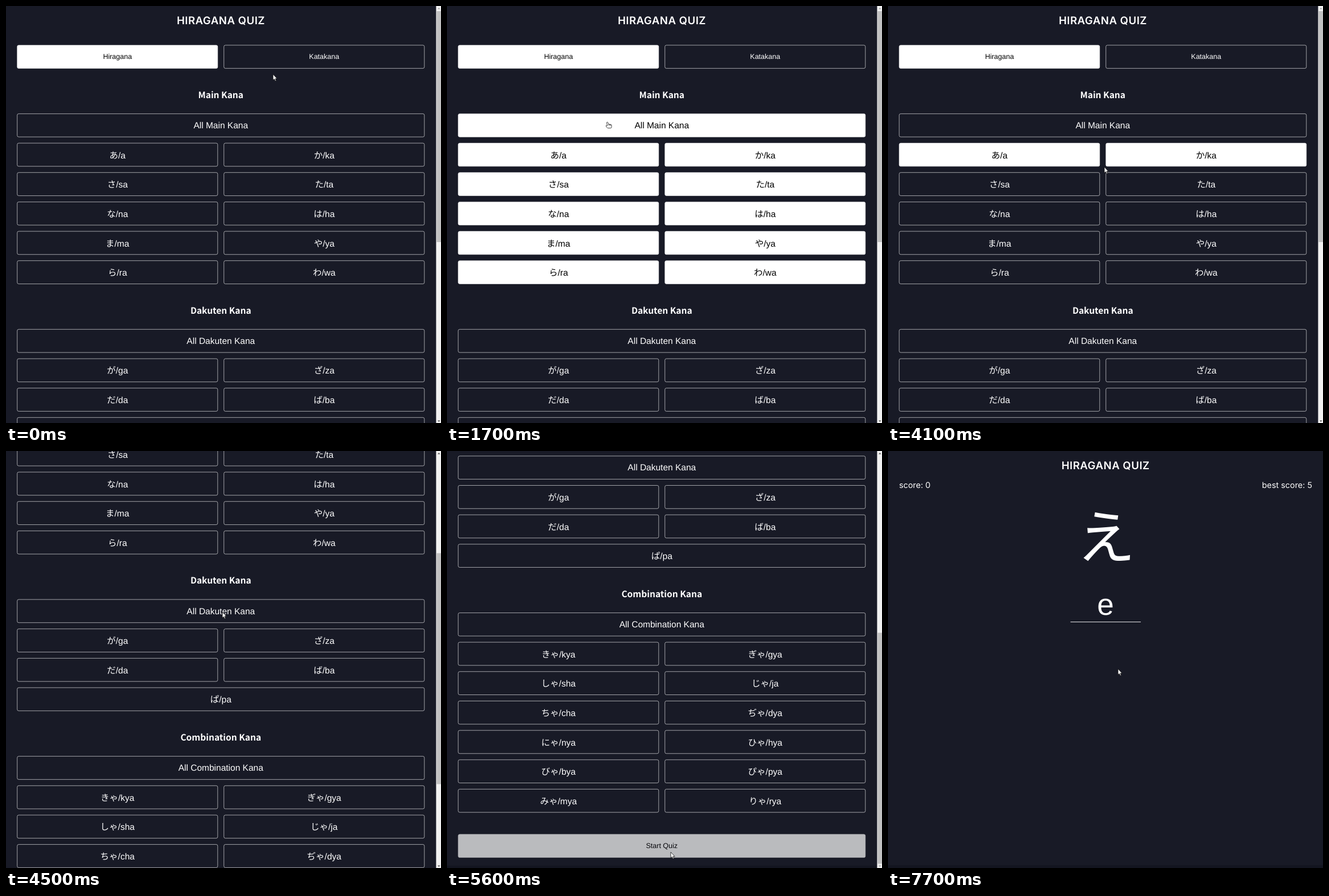
Recreate the animation shown at these times as an HTML page. Size 764 px wide and 733 px high, loop 8 s.

```html
<!DOCTYPE html>
<html lang="en">
<head>
<meta charset="utf-8">
<title>Kana quiz</title>
<style>
html, body { margin: 0; width: 100%; height: 100%; overflow: hidden; background: #181a26; }
svg { display: block; width: 764px; height: 733px; }
text {
  fill: #fff; text-anchor: middle; text-rendering: geometricPrecision;
  font-family: "Liberation Sans", "Noto Sans CJK JP", sans-serif;
}
.title { font: 600 18.6px Inter, sans-serif; letter-spacing: .5px; }
.score { font: 400 14.4px Inter, sans-serif; }
.head { font: 700 15.5px "Noto Sans CJK JP", sans-serif; }
.tab { font-size: 12.5px; }
.kana { font-size: 15.5px; }
.big { font: 500 103px "Noto Sans CJK JP", sans-serif; }
.answer { font-size: 53px; }
.btn rect { fill: none; stroke: #fff; stroke-width: .6px; }
.on rect { fill: #fff; }
.on text { fill: #000; }
</style>
</head>
<body>
<svg id="stage" viewBox="0 0 764 733"></svg>
<script>
const LOOP = 8000, STEP = 100;
const PAD = 19.4, GAP = 10.33, HIGH = 41.33, PITCH = HIGH + GAP;
const stage = document.getElementById('stage');

function add(parent, tag, attrs = {}, content) {
  const el = document.createElementNS('http://www.w3.org/2000/svg', tag);
  for (const key in attrs) el.setAttribute(key, attrs[key]);
  if (content) el.textContent = content;
  parent.appendChild(el);
  return el;
}

function label(parent, cls, x, y, content, anchor = 'middle') {
  return add(parent, 'text', { class: cls, x, y, style: 'text-anchor:' + anchor }, content);
}

const box = (parent, x, y, width, height, fill) => add(parent, 'rect', { x, y, width, height, fill });

// Builds one selection page; returns its group and the buttons by name.
function menu(width, title, sections) {
  const g = add(stage, 'g'), found = {};
  const full = width - 2 * PAD, half = (full - GAP) / 2;

  function button(y, text, cls, drop, col) {
    const b = found[text] = add(g, 'g', { class: 'btn' });
    const w = col === undefined ? full : half;
    const x = PAD + (col ? half + GAP : 0);
    add(b, 'rect', { x: x + .3, y: y + .3, width: w - .6, height: HIGH - .6, rx: 2.6 });
    label(b, cls, x + w / 2, y + drop, text);
    return b;
  }

  label(g, 'title', width / 2 + .2, 32, title);
  ['Hiragana', 'Katakana'].forEach((text, i) => button(68.6, text, 'tab', 24.5, i));
  let y = 189.1;
  for (const [name, words] of sections) {
    const list = words.split(' ');
    label(g, 'head', width / 2, y - 27.5, name + ' Kana');
    button(y, `All ${name} Kana`, 'kana', 25.9);
    list.forEach((word, i) => {
      const alone = i % 2 === 0 && i === list.length - 1;
      button(y + PITCH * (1 + (i >> 1)), word, 'kana', 26.8, alone ? undefined : i % 2);
    });
    y += PITCH * Math.ceil(list.length / 2) + HIGH + 79.3;
  }
  button(y - 41.2, 'Start Quiz', 'tab', 24.5).classList.add('on');
  box(g, 0, Math.max(728, y + 14), width, 6, '#131520');
  return { g, found };
}

const MAIN = 'あ/a か/ka さ/sa た/ta な/na は/ha ま/ma や/ya ら/ra わ/wa';
const hira = menu(754.5, 'HIRAGANA QUIZ', [
  ['Main', MAIN],
  ['Dakuten', 'が/ga ざ/za だ/da ば/ba ぱ/pa'],
  ['Combination', 'きゃ/kya ぎゃ/gya しゃ/sha じゃ/ja ちゃ/cha ぢゃ/dya ' +
    'にゃ/nya ひゃ/hya びゃ/bya ぴゃ/pya みゃ/mya りゃ/rya']
]);
const kata = menu(764, 'KATAKANA QUIZ', [
  ['Main', 'ア/a カ/ka サ/sa タ/ta ナ/na ハ/ha マ/ma ヤ/ya ラ/ra ワ/wa']
]);

// Scrollbar
const bar = add(stage, 'g');
box(bar, 755.4, 0, 8.6, 733, '#f1f1f1');
const thumb = box(bar, 756.4, 9, 7.6, 406, '#c1c1c1');
const up = add(bar, 'path', { d: 'M758 5.5L760.3 3L762.6 5.5Z' });
const down = add(bar, 'path', { d: 'M758 728.5L760.3 731L762.6 728.5Z' });

// Question page
const quiz = add(stage, 'g');
label(quiz, 'title', 382.2, 32, 'HIRAGANA QUIZ');
label(quiz, 'score', 19.4, 65, 'score: 0', 'start');
label(quiz, 'score', 745, 65, 'best score: 5', 'end');
label(quiz, 'big', 383, 189, 'え');
const answer = label(quiz, 'answer', 382, 288, 'e');
const caret = box(quiz, 382, 240, 1, 58, '#fff');
box(quiz, 320.5, 300, 123.5, 1, '#e4e4e6');
box(quiz, 0, 728, 764, 5, '#131520');

// Pointers, both with the hot spot at 0,0
const pen = { fill: '#fff', stroke: '#111', 'stroke-width': .8, 'stroke-linejoin': 'round' };
const arrow = add(stage, 'path', { ...pen, d: 'M0 0V10.3L2.3 8.3L3.9 11.9L5.5 11.2L4 7.8H7.1Z' });
const hand = add(stage, 'path', { ...pen,
  d: 'M-1.6 .9C-1.3 -.2 .3 -.2 .7 .9L2 4L5.4 4.2Q7 4.5 7 6V8.8Q7 10.6 5.4 10.6H.8' +
     'Q-.4 10.6 -1.2 9.4L-2.8 7Q-2.9 5.8 -1.6 6L-.3 6.4ZM2.1 4V6M3.9 4.2V6M5.5 4.4V6' });

// Pointer moves: begin, end, x, y
const moves = [
  [0, 200, 463, 92], [400, 900, 234, 89], [1200, 1500, 282, 204],
  [1700, 2000, 298, 142], [2000, 2300, 285, 190], [2500, 3000, 298, 262],
  [3200, 3500, 411, 264], [3900, 4100, 380, 283], [5000, 5500, 393, 705],
  [5700, 5900, 354, 419], [5900, 6900, 404, 383]
];
const SCROLL = 559.5;

const part = (t, from, to) => Math.min(1, Math.max(0, (t - from) / (to - from)));
const smooth = f => f * f * (3 - 2 * f);
const within = (t, from, to) => t >= from && t < to;
const show = (el, yes) => el.setAttribute('visibility', yes ? 'visible' : 'hidden');
const lit = (page, name, yes) => page.found[name].classList.toggle('on', yes);

function pointer(t) {
  let x = 469, y = 120;
  for (const [from, to, nx, ny] of moves) {
    const f = smooth(part(t, from, to));
    x += (nx - x) * f;
    y += (ny - y) * f;
  }
  return `translate(${Math.round(x)} ${Math.round(y)})`;
}

function draw(t) {
  const onKata = within(t, 400, 1100), onQuiz = t >= 5700, onHira = !onKata && !onQuiz;
  show(hira.g, onHira);
  show(bar, onHira);
  show(kata.g, onKata);
  show(quiz, onQuiz);

  lit(hira, 'Hiragana', true);
  lit(hira, 'Katakana', within(t, 100, 400));
  lit(kata, 'Katakana', true);
  lit(kata, 'Hiragana', t >= 700);
  lit(hira, 'All Main Kana', within(t, 1500, 2800));
  for (const word of MAIN.split(' ')) lit(hira, word, within(t, 1700, 2400));
  if (t >= 2900) lit(hira, 'あ/a', true);
  if (t >= 3400) lit(hira, 'か/ka', true);
  hira.found['Start Quiz'].setAttribute('opacity', t >= 5500 ? .7 : 1);

  const scrolled = 1 - (1 - part(t, 4300, 4800)) ** 1.56;
  hira.g.setAttribute('transform', `translate(0 ${-SCROLL * scrolled})`);
  thumb.setAttribute('y', 9 + 310.5 * scrolled);
  up.setAttribute('fill', scrolled > 0 ? '#505050' : '#a3a3a3');
  down.setAttribute('fill', scrolled < 1 ? '#505050' : '#a3a3a3');

  const typed = t >= 7000;
  show(answer, onQuiz && typed);
  caret.setAttribute('x', typed ? 396 : 382);
  show(caret, onQuiz && (typed ? t < 7700 : (t - 5700) % 1000 < 500));

  const spot = pointer(t);
  const pointing = within(t, 100, 1300) || within(t, 1500, 1800) || within(t, 2300, 4100);
  for (const el of [arrow, hand]) {
    el.setAttribute('transform', spot);
    show(el, pointing === (el === hand));
  }
}

const start = performance.now();
function tick() {
  const t = (performance.now() - start) % LOOP;
  draw(Math.floor(t / STEP) * STEP);
  requestAnimationFrame(tick);
}
tick();
</script>
</body>
</html>
```
